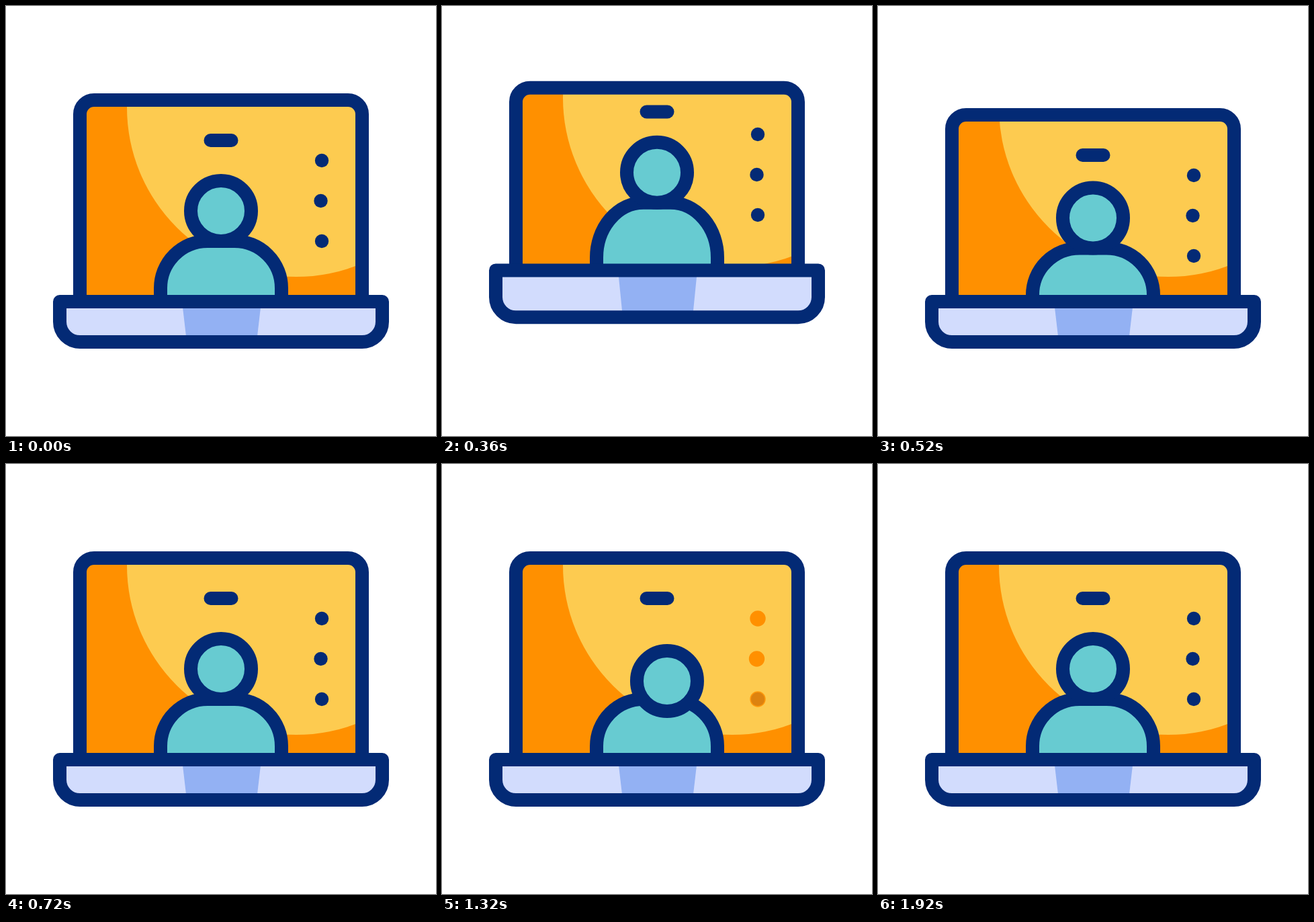
An HTML page for the animation above (2 s loop, 640 px wide and 640 px high).

```html
<!DOCTYPE html>
<html lang="en">
<head>
<meta charset="utf-8">
<title>Video call</title>
<style>
  html, body { margin: 0; width: 100%; height: 100%; overflow: hidden; background: #fff; }
  svg { display: block; width: 100%; height: 100%; }
  .line { stroke: #032a75; stroke-width: 20; stroke-linecap: round; stroke-linejoin: round; }
  .dot { fill: #032a75; }
  .glow { fill: #ff9000; }
</style>
</head>
<body>
<svg viewBox="0 0 640 640">
  <defs><clipPath id="clip"><path id="clipShape"/></clipPath></defs>
  <path id="screenFill" fill="#ff9000"/>
  <g clip-path="url(#clip)"><circle id="disc" cx="432" cy="151" r="252" fill="#fdcb50"/></g>
  <path id="screen" class="line" fill="none"/>
  <path id="pill" class="line" d="M304.5 200H335.5"/>
  <g id="dots"></g>
  <path id="body" class="line" fill="#67cbd1"/>
  <circle id="head" class="line" cx="320" cy="305" r="45" fill="#67cbd1"/>
  <path id="baseFill" fill="#d2dcfd"/>
  <path id="notch" fill="#93b1f3"/>
  <path id="base" class="line" fill="none"/>
</svg>
<script>
const LOOP = 2000, STEP = 40;
const el = id => document.getElementById(id);
const setPath = (d, ...ids) => ids.forEach(id => el(id).setAttribute('d', d));
const shift = (id, x, y) => el(id).setAttribute('transform', `translate(${x} ${y})`);

const linear = (t, from, to) => Math.min(1, Math.max(0, (t - from) / (to - from)));
const ease = (t, from, to) => {
  const x = linear(t, from, to);
  return x * x * (3 - 2 * x);
};

// Listed from the bottom up, the order in which they light.
const dots = [[470, 350], [468.5, 290], [470, 230]].map(([cx, cy]) => {
  const add = (name, r) => {
    const c = document.createElementNS('http://www.w3.org/2000/svg', 'circle');
    Object.entries({ class: name, cx, cy, r }).forEach(([k, v]) => c.setAttribute(k, v));
    return el('dots').appendChild(c);
  };
  add('dot', 10.2);
  return add('glow', 11.7);
});

function drawJump(t) {
  const rise = ease(t, 80, 320), fall = ease(t, 320, 520), settle = ease(t, 520, 680);
  const move = (peak, squash = 0) => peak * (rise - fall) + squash * (fall - settle);

  const top = 140 + move(-23, 22);
  const deck = 440 + move(-52);
  const floor = 500 + move(-41);
  const shoulder = 350 + move(-65, 10.5);
  const arm = 420 + move(-52, 10);

  setPath(`M110 ${deck}V${top + 21}a21 21 0 0 1 21 -21H509a21 21 0 0 1 21 21V${deck}`,
    'screenFill', 'clipShape', 'screen');
  setPath(`M80 ${deck}H560V${floor - 30}a30 30 0 0 1 -30 30H110a30 30 0 0 1 -30 -30Z`,
    'baseFill', 'base');
  setPath(`M262 ${deck}H380L373 ${floor}H269Z`, 'notch');
  const h = arm - shoulder;
  setPath(`M230 ${deck}V${arm}a70 ${h} 0 0 1 70 ${-h}h40a70 ${h} 0 0 1 70 ${h}V${deck}`, 'body');

  shift('disc', 0, move(-16));
  shift('pill', 0, move(-50, 22));
  shift('dots', 0, move(-46, 22));
  return move(-65, 10.5);
}

function drawHead(t, jump) {
  const right = ease(t, 840, 1160), left = ease(t, 1280, 1560), back = ease(t, 1640, 1920);
  shift('head', 17 * right - 37 * left + 20 * back, 18 * (right - back) + jump);
}

function drawDots(t) {
  dots.forEach((glow, i) => {
    const on = linear(t, 760 + 120 * i, 920 + 120 * i);
    const off = linear(t, 1285 + 110 * i, 1545 + 110 * i);
    glow.setAttribute('opacity', on - off);
  });
}

function draw(now) {
  const t = Math.floor((now % LOOP) / STEP) * STEP;
  drawHead(t, drawJump(t));
  drawDots(t);
}

function tick(now) {
  draw(now);
  requestAnimationFrame(tick);
}
draw(0);
requestAnimationFrame(tick);
</script>
</body>
</html>
```
